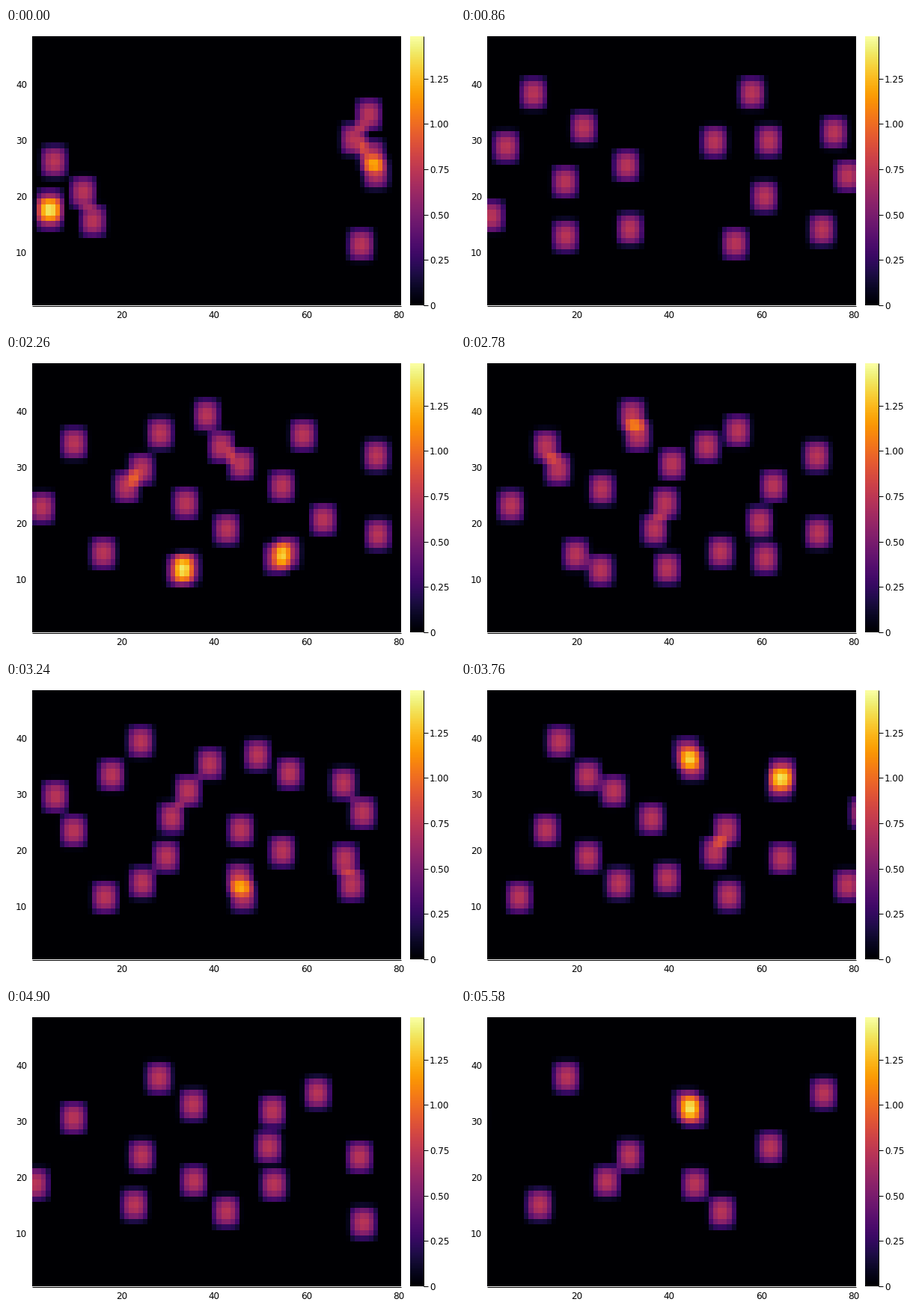
A matplotlib script for the animation above (5.68 s loop, 600x400 px).

```python
import numpy as np
import matplotlib.pyplot as plt
from matplotlib.animation import FuncAnimation

W, H, DPI = 600, 400, 100
COLS, ROWS = 80, 48
LEFT, RIGHT, TOP, BOTTOM = 35, 528, 11, 371
CW, CH = (RIGHT - LEFT) / COLS, (BOTTOM - TOP) / ROWS
PEAK, VMAX, RADIUS = 0.74, 1.483, 3.9
STEPS, TICK, LOOP = 120, 20, 5680
MEET = 49  # step at which the two streams mix

# Walkers: x at MEET, relative speed, lane y at first, lane y in the end
EAST_FIRST = [(288, 1.01, 179, 122), (240, 0.82, 237, 198), (242, 0.83, 250, 286),
              (369, 1.20, 220, 175), (362, 1.11, 258, 272)]
WEST_FIRST = [(268, 0.98, 116, 80), (181, 1.28, 149, 153), (314, 0.79, 171, 146),
              (295, 0.90, 194, 234), (231, 1.10, 290, 288)]
EAST_SECOND = [(206, 0.74, 88, 114), (161, 0.67, 159, 186), (130, 0.58, 252, 272),
               (91, 0.56, 96, 130), (48, 0.47, 222, 195)]
WEST_SECOND = [(376, 0.72, 270, 262), (397, 0.68, 140, 90), (424, 0.61, 198, 232),
               (495, 0.49, 131, 137), (497, 0.49, 253, 234)]

steps = np.arange(STEPS)
# Everyone slows down until the streams meet, then speeds up again
travel = np.cumsum(3.6 + 0.045 * np.abs(steps - 45))
travel -= travel[MEET]


def wave(walkers, heading, start, settle, rush):
    """Paths (walker, step, xy): shared pace in x, easing to the lane in y."""
    x, speed, y0, y1 = np.array(walkers).T[:, :, None]
    hurry = rush * np.maximum(25 - steps, 0)
    fade = np.exp(-np.maximum(steps - start, 0) / settle)
    return np.stack([x + heading * (speed * travel - hurry),
                     y1 + (y0 - y1) * fade], axis=-1)


PATHS = np.concatenate([
    wave(EAST_FIRST, 1, 0, 12, 0), wave(WEST_FIRST, -1, 0, 12, 0),
    wave(EAST_SECOND, 1, 19, 28, 3), wave(WEST_SECOND, -1, 19, 28, 3)])
CX, CY = np.arange(COLS) + 0.5, np.arange(ROWS) + 0.5


def bump(d):
    """Smooth compact bump, 1 at the centre and 0 beyond RADIUS cells."""
    u2 = np.minimum((d / RADIUS) ** 2, 1 - 1e-6)
    return np.exp(1 - 1 / (1 - u2))


def density(step):
    gx = (PATHS[:, step, 0] - LEFT) / CW
    gy = (PATHS[:, step, 1] - TOP) / CH
    return PEAK * bump(CY[:, None] - gy) @ bump(CX[:, None] - gx).T


def step_at(ms):
    """Steps last 20, 100 and 20 ms in turn."""
    turn, rest = divmod(ms, 140)
    return min(3 * turn + (rest >= 20) + (rest >= 120), STEPS - 1)


fig = plt.figure(figsize=(W / DPI, H / DPI), dpi=DPI, facecolor="white")
ax = fig.add_axes([0, 0, 1, 1])
ax.set_axis_off()

look = dict(cmap="inferno", interpolation="nearest", aspect="auto")
heat = ax.imshow(density(0), vmin=0, vmax=VMAX,
                 extent=(LEFT, RIGHT, BOTTOM, TOP), **look)
ax.imshow(np.linspace(1, 0, 256)[:, None], extent=(540, 558, BOTTOM, TOP), **look)
ax.set_xlim(0, W)
ax.set_ylim(H, 0)


def line(x0, y0, x1, y1):
    ax.plot([x0, x1], [y0, y1], color="black", lw=72 / DPI, solid_capstyle="butt")


def label(x, y, text, ha):
    ax.text(x, y, text, ha=ha, va="center_baseline", fontsize=12 * 72 / DPI,
            family="DejaVu Sans", color="black")


for n in (20, 40, 60, 80):
    label(LEFT + (n - 0.5) * CW, 382.5, str(n), "center")
for n in (10, 20, 30, 40):
    label(28, BOTTOM - (n - 0.5) * CH, str(n), "right")

line(LEFT, BOTTOM + 1, RIGHT, BOTTOM + 1)
line(558, TOP, 558, BOTTOM)
for n in range(6):
    y = BOTTOM - n * 0.25 / VMAX * (BOTTOM - TOP)
    line(558, y, 564, y)
    label(566, y, f"{n * 0.25:.2f}" if n else "0", "left")


def update(i):
    heat.set_data(density(step_at(i * TICK)))
    return heat,


anim = FuncAnimation(fig, update, frames=LOOP // TICK, interval=TICK,
                     repeat=True, repeat_delay=0, blit=False)
plt.show()
```
